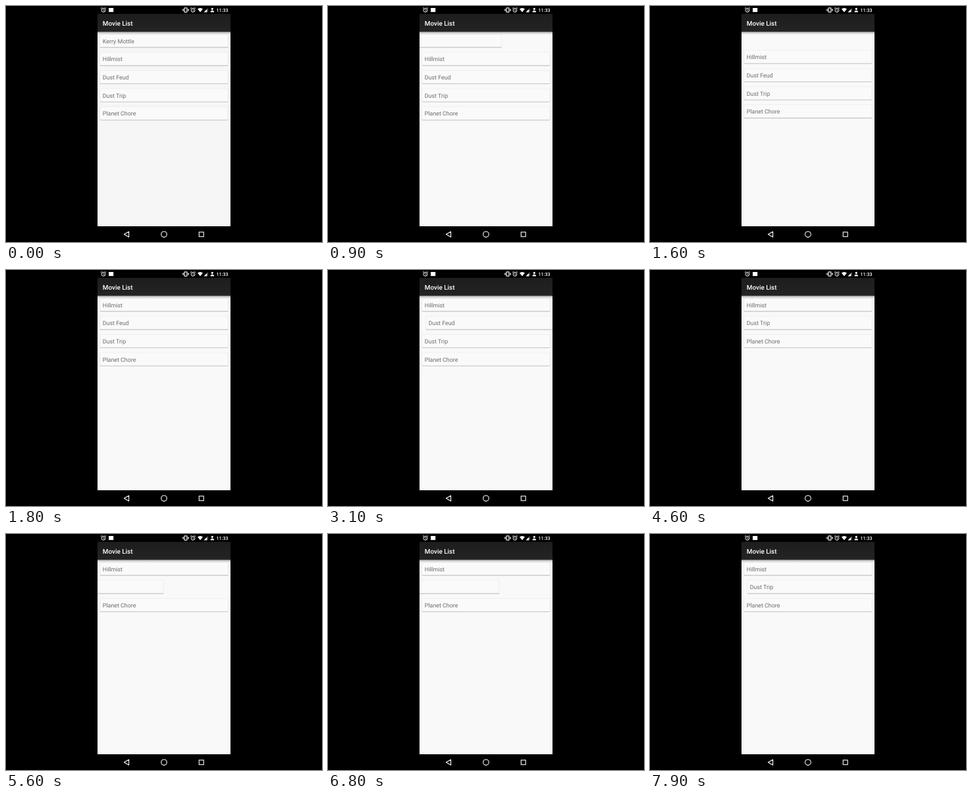
Recreate the animation shown at these times as an HTML page. Size 480 px wide and 360 px high, loop 8000 ms.

```html
<!DOCTYPE html>
<html lang="en">
<head>
<meta charset="utf-8">
<title>Swipe to dismiss list</title>
<style>
html, body { margin: 0; width: 100%; height: 100%; overflow: hidden; background: #000; }
svg { display: block; width: 480px; height: 360px; }
text { font-family: Roboto, sans-serif; text-rendering: geometricPrecision; }
.card text { font-size: 8.9px; fill: #6c6c6c; }
.bar { fill: #fff; font-weight: 500; }
.line { fill: none; stroke: #fff; }
</style>
</head>
<body>
<svg viewBox="0 0 480 360">
  <defs>
    <clipPath id="screen"><rect x="139" y="39" width="202" height="297"/></clipPath>
    <linearGradient id="shade" x2="0" y2="1">
      <stop stop-opacity=".42"/>
      <stop offset=".4" stop-opacity=".16"/>
      <stop offset="1" stop-opacity="0"/>
    </linearGradient>
    <linearGradient id="header" x2="0" y2="1">
      <stop stop-color="#1d1d1d"/>
      <stop offset="1" stop-color="#242424"/>
    </linearGradient>
    <g id="alarm" class="line">
      <circle r="2.9" cy=".4" stroke-width="1"/>
      <path d="M0-1.2V.7L1.3 1.5M-3.9-2.2L-2-3.8M3.9-2.2L2-3.8" stroke-width=".9"/>
    </g>
  </defs>
  <rect width="480" height="360"/>
  <rect id="page" x="139" y="39" width="202" height="297"/>
  <g id="list" clip-path="url(#screen)"></g>
  <rect x="139" y="39" width="202" height="5" fill="url(#shade)"/>
  <rect x="139" y="12" width="202" height="27.3" fill="url(#header)"/>
  <text class="bar" x="146.8" y="29.5" font-size="9.9">Movie List</text>

  <use href="#alarm" x="148" y="6"/>
  <rect x="156" y="3" width="7.2" height="6.2" fill="#fff"/>
  <g class="line">
    <rect x="271.2" y="2.9" width="3.6" height="6.4" stroke-width="1.1"/>
    <path d="M269.6 4V8.2M276.4 4V8.2M268.4 5V7.2M277.6 5V7.2" stroke-width=".8"/>
  </g>
  <use href="#alarm" x="284" y="6"/>
  <g fill="#fff">
    <path d="M291 4.4Q295 1.4 299 4.4L295 9.4Z"/>
    <path d="M300.6 9.4L307 3V9.4Z" opacity=".35"/>
    <path d="M300.6 9.4L305 5V9.4Z"/>
    <circle cx="313.3" cy="4.4" r="1.6"/>
    <path d="M310.7 9.4V8Q313.3 5.4 315.9 8V9.4Z"/>
  </g>
  <text class="bar" x="319.5" y="8.7" font-size="7.1">11:33</text>

  <g class="line" stroke-width="1.1">
    <path d="M179.4 348.3L186.6 344.2V352.4Z" stroke-linejoin="round"/>
    <circle cx="240" cy="348.3" r="4.3"/>
    <rect x="293.3" y="344.9" width="6.9" height="6.9"/>
  </g>
</svg>
<script>
const LOOP = 8000, STEP = 100, PITCH = 27.7;
const titles = ["Kerry Mottle", "Hillmist", "Dust Feud", "Dust Trip", "Planet Chore"];

// Horizontal drags per row: [time, offset] points joined by straight lines
const drags = {
  0: [[400, 0], [500, -5], [800, -52], [1300, -160], [1400, -210]],
  2: [[3000, 0], [3100, 6], [3800, 94], [3900, 114], [4200, 206]],
  3: [[4900, 0], [5000, -5], [5800, -129], [5900, -140], [6000, -148], [6200, -157],
      [6300, -157], [6400, -147], [6800, -77], [7000, -47], [7200, -25],
      [7400, -12], [7600, -4], [7900, 5]]
};
// Rows below a dismissed one close the gap
const closings = [{ row: 0, start: 1557 }, { row: 2, start: 4357 }];

const list = document.getElementById("list");
const page = document.getElementById("page");
list.innerHTML = titles.map(title => `<g class="card">
  <rect x="142.6" y="42.7" width="194.8" height="21.2" rx="1" fill="#e6e6e6"/>
  <rect x="143" y="61.5" width="194" height="2.2" rx="1" fill="#c6c6c6"/>
  <rect x="143.2" y="43.2" width="193.6" height="19.4" rx=".8" fill="#fafafa"/>
  <text x="146.8" y="56.7">${title}</text></g>`).join("");
const cards = [...list.children];

function follow(points, t) {
  if (t <= points[0][0]) return points[0][1];
  for (let i = 1; i < points.length; i++) {
    const [t0, x0] = points[i - 1], [t1, x1] = points[i];
    if (t <= t1) return x0 + (x1 - x0) * (t - t0) / (t1 - t0);
  }
  return points[points.length - 1][1];
}

function ease(u) {
  return (1 - Math.cos(Math.PI * Math.min(1, Math.max(0, u)))) / 2;
}

function draw() {
  const t = Math.floor(performance.now() % LOOP / STEP) * STEP;
  page.setAttribute("fill", t < 500 ? "#f6f6f6" : "#f9f9f9");
  cards.forEach((card, i) => {
    const x = drags[i] ? follow(drags[i], t) : 0;
    let row = i;
    for (const c of closings) if (i > c.row) row -= ease((t - c.start) / 200);
    card.setAttribute("transform", `translate(${x} ${row * PITCH})`);
  });
  requestAnimationFrame(draw);
}
draw();
</script>
</body>
</html>
```
